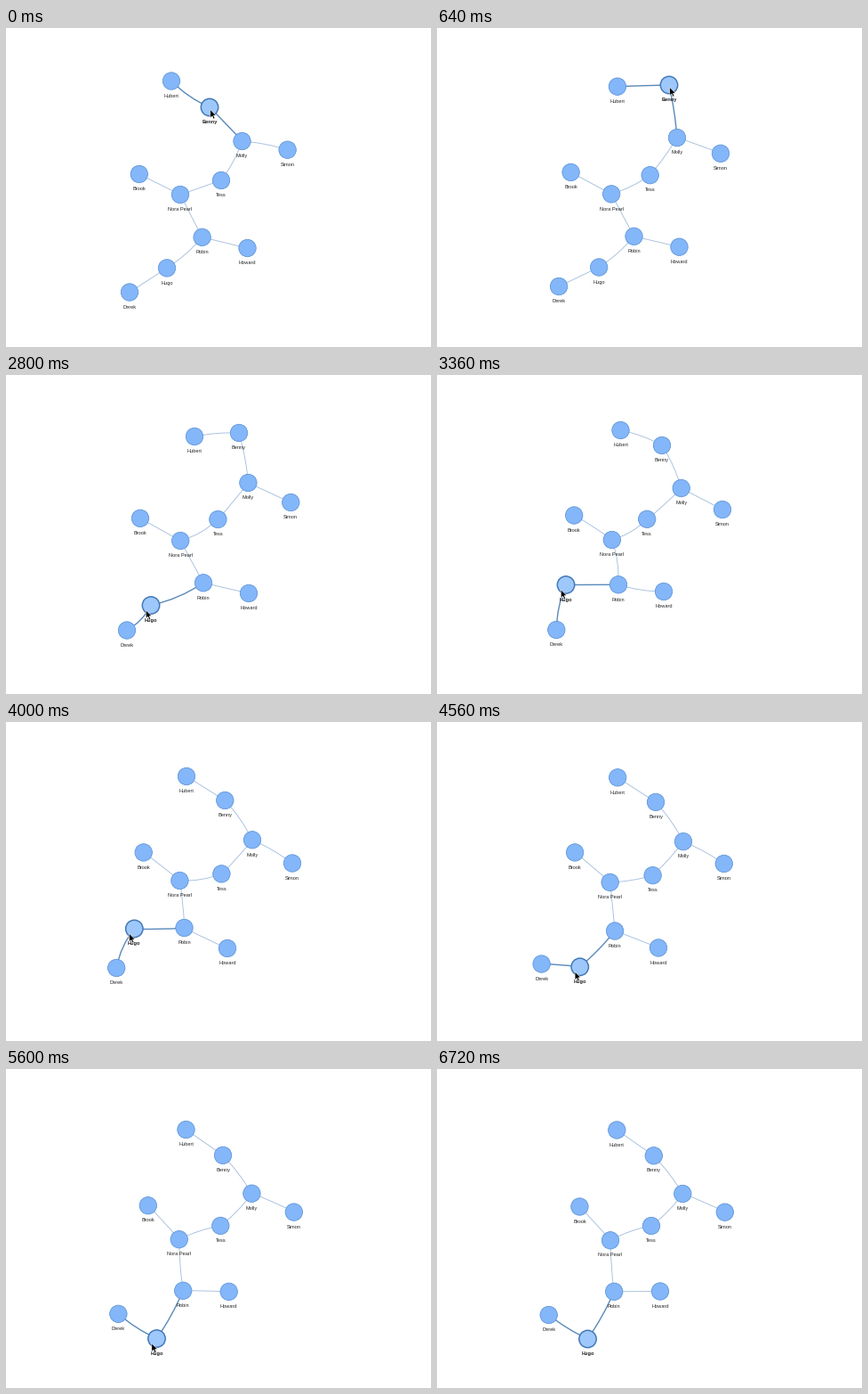
These frames come from a looping animation (478x358 px, 6.8 s). A matplotlib script:

```python
import matplotlib.pyplot as plt
import numpy as np
from matplotlib.animation import FuncAnimation
from matplotlib.patches import Circle, PathPatch, Polygon
from matplotlib.path import Path

W, H, DPI = 478, 358, 100
STEP, FRAMES = 80, 85
PX = 72 / DPI  # points per pixel
RADIUS = 9.7

# Resting layouts the graph drifts through, one point per layout
NODES = {
    "Hubert": [(186, 59.5), (212, 69), (206.5, 62), (203, 61), (203.5, 65.5), (202.3, 68.5)],
    "Benny": [(229, 89), (262, 65), (253, 79), (246.3, 88), (245.3, 94.2), (243.8, 97.3)],
    "Molly": [(265.5, 127), (272.4, 121), (274.7, 127), (277, 132.3), (277, 138), (276.3, 140)],
    "Simon": [(316.6, 136.7), (320.3, 143), (321, 151), (322, 158.5), (324, 160), (323.8, 160.7)],
    "Brook": [(149.8, 164), (151, 160.8), (154.2, 157.5), (154.7, 146.4), (156.4, 146.5), (160.4, 154.5)],
    "Tess": [(242, 171), (238.4, 162), (236.2, 161.8), (242.4, 170.4), (243, 175.4), (241, 176)],
    "Nora Pearl": [(196, 187), (196.2, 186), (196.8, 185), (195.4, 178), (193.3, 185), (195, 192.3)],
    "Robin": [(220.6, 234.8), (222, 233.3), (204, 235.3), (200.5, 231), (199.3, 242.7), (199.2, 249.8)],
    "Howard": [(271.5, 247), (273, 245), (255, 243), (249, 254), (249, 252), (251, 249.5)],
    "Hugo": [(181, 269.4), (182.8, 268), (145, 235.5), (144.3, 232), (169.5, 300), (169.5, 303)],
    "Derek": [(139, 296.5), (136, 286.5), (134.3, 286), (124.2, 276), (130, 268.5), (125.7, 276)],
}

# Sideways bow of each edge in the same layouts
EDGES = {
    ("Hubert", "Benny"): [2.5, -1.5, -2, 0, 0, 0],
    ("Benny", "Molly"): [-0.5, -1.5, -2, -2, -1.5, -1.5],
    ("Molly", "Simon"): [-1.5, 0, 0, -1.5, -1, -1],
    ("Molly", "Tess"): [-2, -0.5, -1, -1, -1.5, -2],
    ("Tess", "Nora Pearl"): [0, -3, -3, -2.5, 0.5, 2],
    ("Brook", "Nora Pearl"): [0, 0, -1, -0.5, -0.8, -0.5],
    ("Nora Pearl", "Robin"): [0, 0, -2.5, -1, 1.5, 1],
    ("Robin", "Hugo"): [-2, -2, 0, -1, -2, -1.5],
    ("Robin", "Howard"): [0, 0, 2, 0.5, -2, 0],
    ("Hugo", "Derek"): [0, 0, 2.5, 3, -3.5, -1.5],
}

# Time in ms -> layout position; fractions lie between two layouts
SCHEDULE = {0: 0, 40: 0, 640: 0.65, 1440: 1, 2800: 1, 3360: 2, 4000: 3,
            4280: 3, 4960: 4, 5680: 4.9, 6080: 5, 6800: 5}

# Dragged nodes run ahead of the rest
EXTRA = {
    "Benny": {640: (261, 64), 800: (262, 64)},
    "Hugo": {2560: (182.8, 268), 2800: (163, 258.5), 3120: (146, 236.5),
             4720: (168.5, 296)},
    "Derek": {3040: (131.3, 289), 4600: (117.3, 271)},
    ("Robin", "Hugo"): {2560: -2, 2800: -3},
    ("Hugo", "Derek"): {2560: 0, 2800: -3},
}

PICK_TIME = 2640
NODE_STYLE = {False: ("#84b6fa", "#5c94d6", 0.8), True: ("#9ec8fb", "#4378b8", 1.5)}
EDGE_STYLE = {False: ("#a6bfde", 0.9), True: ("#5a8abb", 1.4)}


def make_track(keys):
    """Monotone cubic path through {time: value}."""
    times = np.array(sorted(keys), float)
    pts = np.array([np.atleast_1d(keys[t]) for t in sorted(keys)], float)
    gaps = np.diff(times)
    rise = np.diff(pts, axis=0) / gaps[:, None]
    slope = np.zeros_like(pts)
    a, b = rise[:-1], rise[1:]
    same = a * b > 0
    slope[1:-1] = np.where(same, 2 * a * b / np.where(same, a + b, 1), 0)

    def at(t):
        i = int(np.clip(np.searchsorted(times, t, "right") - 1, 0, len(gaps) - 1))
        h = gaps[i]
        u = np.clip((t - times[i]) / h, 0, 1)
        return ((1 + 2 * u) * (1 - u) ** 2 * pts[i] + u * (1 - u) ** 2 * h * slope[i]
                + u * u * (3 - 2 * u) * pts[i + 1] - u * u * (1 - u) * h * slope[i + 1])

    return at


def scheduled(name, layouts):
    pts = np.array(layouts, float)
    keys = {}
    for t, pos in SCHEDULE.items():
        i = min(int(pos), len(pts) - 2)
        keys[t] = pts[i] + (pos - i) * (pts[i + 1] - pts[i])
    keys.update(EXTRA.get(name, {}))
    return make_track(keys)


node_at = {name: scheduled(name, pts) for name, pts in NODES.items()}
bow_at = {pair: scheduled(pair, bows) for pair, bows in EDGES.items()}

GRIP_A, GRIP_B = np.array([0.8, 2.5]), np.array([-5.6, 5.4])
roam = make_track({720: node_at["Benny"](720) + GRIP_A, 1440: (275, 147.5),
                   1600: (267.8, 169.5), 1680: (267.8, 169.5),
                   2320: node_at["Hugo"](2320) + GRIP_B,
                   2560: node_at["Hugo"](2560) + GRIP_B})
leave = make_track({5680: node_at["Hugo"](5680) + GRIP_B, 6080: (163, 362)})


def cursor_at(t):
    if t < 720:
        return node_at["Benny"](t) + GRIP_A
    if t < 2560:
        return roam(t)
    if t < 5680:
        return node_at["Hugo"](t) + GRIP_B
    return leave(t)


fig = plt.figure(figsize=(W / DPI, H / DPI), dpi=DPI, facecolor="white")
ax = fig.add_axes([0, 0, 1, 1])
ax.set_xlim(0, W)
ax.set_ylim(H, 0)
ax.axis("off")

edges, discs, labels = {}, {}, {}
CURVE = [Path.MOVETO, Path.CURVE3, Path.CURVE3]
for pair in EDGES:
    edges[pair] = ax.add_patch(PathPatch(Path(np.zeros((3, 2)), CURVE), fill=False, zorder=1))
for name in NODES:
    discs[name] = ax.add_patch(Circle((0, 0), RADIUS, zorder=2))
    labels[name] = ax.text(0, 0, name, family="Liberation Sans", size=5.6 * PX,
                           color="#222222", ha="center", va="center_baseline", zorder=3)

ARROW = np.array([(0, 0), (0, 9.2), (2.1, 7.3), (3.7, 10.6), (5.2, 9.9), (3.7, 6.7), (6.4, 6.5)])
cursor = ax.add_patch(Polygon(ARROW, closed=True, fc="black", ec="white", lw=0.5 * PX, zorder=4))


def draw(frame):
    t = frame * STEP
    picked = "Benny" if t < PICK_TIME else "Hugo"
    spots = {name: at(t) for name, at in node_at.items()}

    for name, spot in spots.items():
        fill, rim, width = NODE_STYLE[name == picked]
        discs[name].set(center=spot, facecolor=fill, edgecolor=rim, linewidth=width * PX)
        labels[name].set(position=spot + (0, 16.2),
                         fontweight="bold" if name == picked else "normal")

    for pair, edge in edges.items():
        a, b = (spots[name] for name in pair)
        dx, dy = b - a
        normal = np.array([-dy, dx]) / np.hypot(dx, dy)
        bend = (a + b) / 2 + 2 * bow_at[pair](t) * normal
        edge.set_path(Path([a, bend, b], CURVE))
        color, width = EDGE_STYLE[picked in pair]
        edge.set(edgecolor=color, linewidth=width * PX)

    cursor.set_xy(ARROW + cursor_at(t))
    return [*edges.values(), *discs.values(), *labels.values(), cursor]


anim = FuncAnimation(fig, draw, frames=FRAMES, interval=STEP, repeat=True,
                     repeat_delay=0, blit=False)
plt.show()
```
